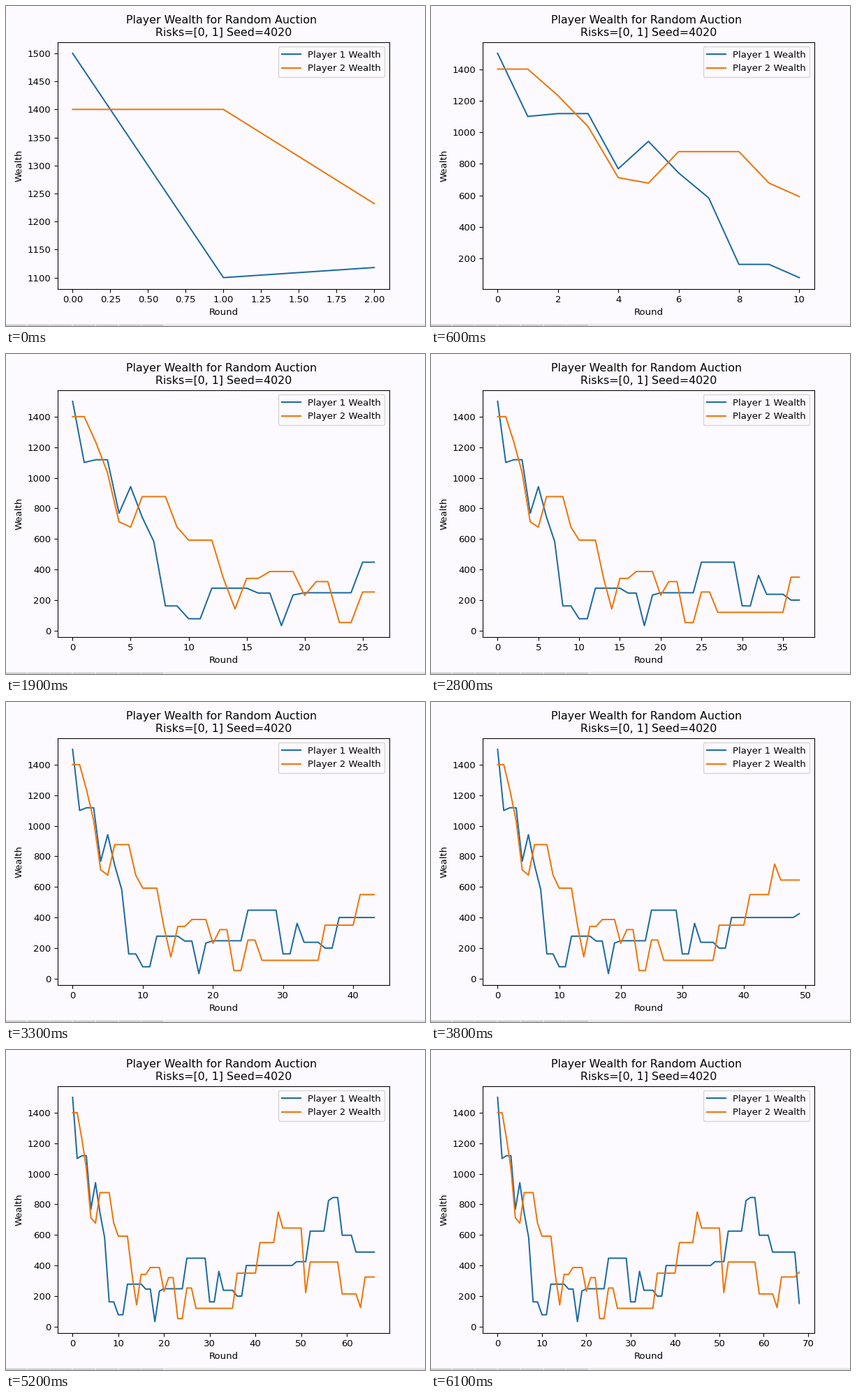
Write a matplotlib script that moves like this. It is 600x459 px and loops after 6300 ms.

```python
import numpy as np
import matplotlib.pyplot as plt
from matplotlib.animation import FuncAnimation
from matplotlib.patches import Rectangle
from matplotlib.transforms import IdentityTransform

W, H, DPI = 600, 459, 96
FRAMES, INTERVAL = 63, 100
LEFT, RIGHT, TOP, BOTTOM = 73.8, 548.9, 51.8, 405.7
PAPER = "#fcfaff"
BLUE, ORANGE = "#1c6aa3", "#f0740a"
LAST_ROUND, LAP_PAY = 68, 200


def wealth(start, laps, trades):
    """Running total: pay for every lap, plus the large gains and losses."""
    change = np.zeros(LAST_ROUND + 1)
    change[0] = start
    change[laps] += LAP_PAY
    for when, amount in trades.items():
        change[when] += amount
    return change.cumsum()


player_1 = wealth(
    1500,
    laps=[12, 19, 25, 32, 38, 52, 56],
    trades={1: -400, 2: 18, 4: -350, 5: 174, 6: -200, 7: -159, 8: -421,
            10: -84, 16: -32, 18: -213, 20: 15, 30: -286, 33: -124,
            36: -38, 49: 25, 57: 20, 59: -247, 62: -110, 68: -336},
)
player_2 = wealth(
    1400,
    laps=[6, 15, 25, 41, 45, 52, 64],
    trades={2: -168, 3: -197, 4: -323, 5: -35, 9: -200, 10: -85, 13: -250,
            14: -200, 17: 45, 20: -156, 21: 90, 23: -268, 27: -133,
            36: 230, 46: -105, 51: -422, 59: -209, 63: -89, 68: 32},
)

plt.rcParams.update({"font.family": "DejaVu Sans", "font.size": 9.976})
fig = plt.figure(figsize=(W / DPI, H / DPI), dpi=DPI, facecolor=PAPER)
ax = fig.add_axes(
    [LEFT / W, 1 - BOTTOM / H, (RIGHT - LEFT) / W, (BOTTOM - TOP) / H],
    facecolor=PAPER,
)

line_1, = ax.plot([], [], color=BLUE, lw=1.5, label="Player 1 Wealth")
line_2, = ax.plot([], [], color=ORANGE, lw=1.5, label="Player 2 Wealth")
ax.legend(loc="upper right", facecolor=PAPER)
ax.set_xlabel("Round")
ax.set_ylabel("Wealth")
ax.set_title("Risks=[0, 1] Seed=4020", fontsize=11.9, pad=6.6)
fig.text(309 / W, 1 - 24.8 / H, "Player Wealth for Random Auction",
         ha="center", va="baseline", fontsize=11.9)


def bar(x, y, w, h, color):
    """Flat rectangle in pixels, measured from the bottom left."""
    fig.add_artist(Rectangle((x, y), w, h, fc=color, lw=0,
                             transform=IdentityTransform()))


# Strip along the bottom edge, with a row of tabs on the left
bar(0, 0, W, 3, "#e7e6e9")
for i in range(7):
    bar(32.7 * i - 2, 0, 31, 2, "#cfced1")


def update(frame):
    last = min(LAST_ROUND, int(2.85 + 1.22 * frame))
    rounds = np.arange(last + 1)
    line_1.set_data(rounds, player_1[:last + 1])
    line_2.set_data(rounds, player_2[:last + 1])
    ax.relim()
    ax.autoscale_view()
    return line_1, line_2


anim = FuncAnimation(fig, update, frames=FRAMES, interval=INTERVAL,
                     init_func=lambda: update(0), repeat=True)
plt.show()
```
